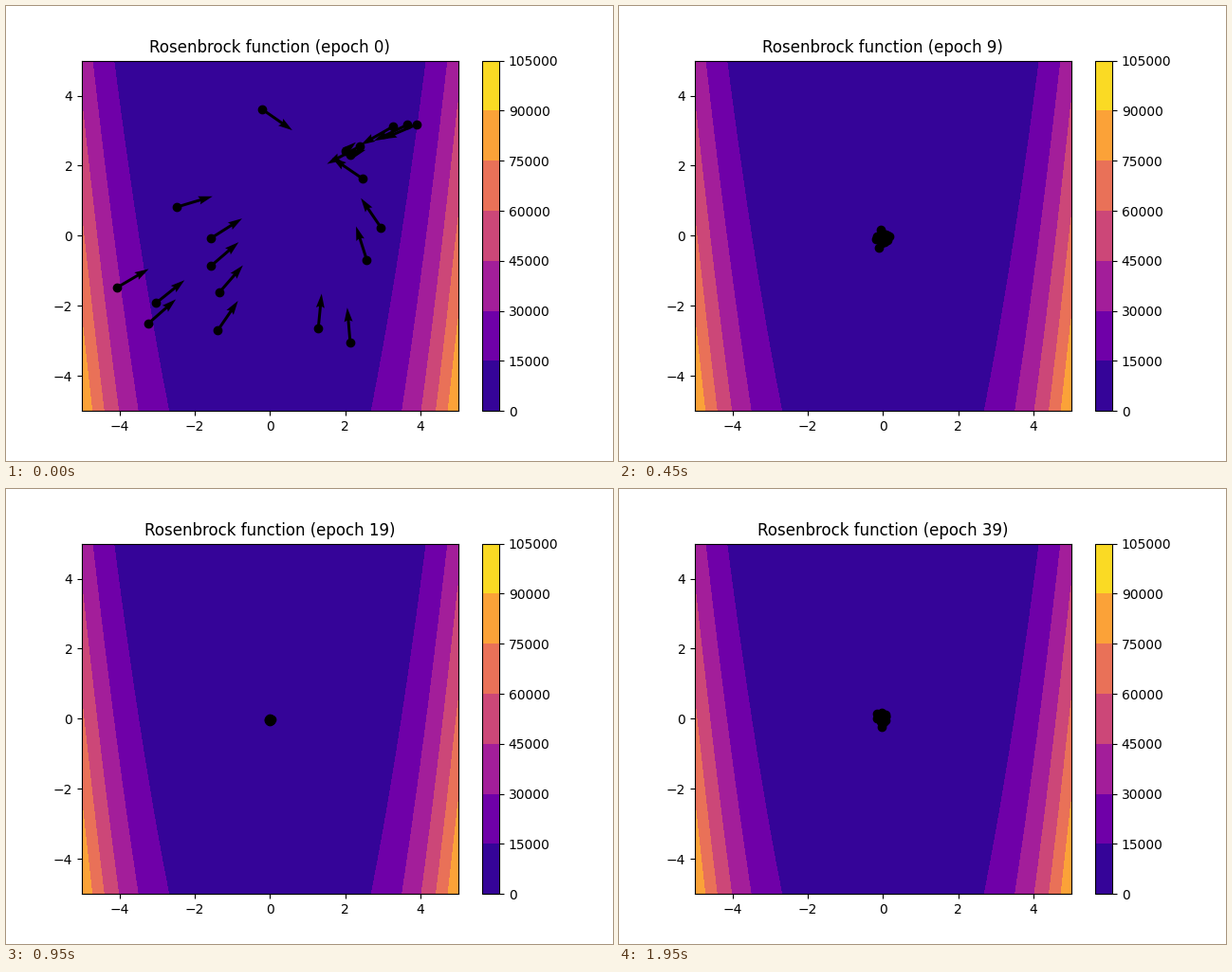
Animation of 640x480 px, one loop 2000 ms. Source, as a matplotlib script:

```python
import numpy as np
import matplotlib.pyplot as plt
from matplotlib.animation import FuncAnimation

EPOCHS = 40
INERTIA = 0.2
FIRST_BEST = np.array([1.72, 2.17])
NEXT_BEST = np.array([-0.5, 0.35])
HOME = np.array([0, -0.02])

START = np.array([
    (-.21, 3.61), (3.27, 3.12), (3.65, 3.17), (3.90, 3.18), (2.38, 2.55),
    (2.00, 2.42), (2.13, 2.31), (2.46, 1.63), (-2.48, .82), (-1.57, -.07),
    (-1.57, -.86), (-1.35, -1.62), (-1.39, -2.70), (-3.03, -1.92),
    (-3.23, -2.50), (-4.07, -1.48), (2.95, .23), (2.57, -.69),
    (1.28, -2.65), (2.13, -3.05)])


def rosenbrock(x, y):
    return (1 - x) ** 2 + 100 * (y - x ** 2) ** 2


def length(v):
    return np.hypot(v[:, :1], v[:, 1:])


def cap(v):
    """Limit every speed to 1."""
    return v / np.maximum(length(v), 1)


def first_step(x):
    """Full speed to the best point; those already there fly on past it."""
    d = FIRST_BEST - x
    r = length(d)
    return np.where(r < 0.5, -d, d / r)


def fly(seed=4):
    """Positions and velocities of the swarm for every epoch."""
    rng = np.random.default_rng(seed)
    x, v = START, first_step(START)
    path = [(x, v)]
    for t in range(1, EPOCHS):
        x = x + v
        goal = NEXT_BEST if t <= 3 else HOME
        # Eager overshooting at first, then a calm approach.
        gain = rng.uniform(1, 2.5, (len(x), 1)) if t < 6 else 0.12
        v = INERTIA * v + gain * (goal - x)
        if t >= 27:
            v = v + rng.normal(0, 0.035, x.shape)
        v = cap(v)
        path.append((x, v))
    return path


path = fly()

fig, ax = plt.subplots(figsize=(6.4, 4.8), dpi=100)
grid = np.linspace(-5, 5, 100)
X, Y = np.meshgrid(grid, grid)
fill = ax.contourf(X, Y, rosenbrock(X, Y), levels=np.arange(0, 105001, 15000),
                   cmap="plasma")
fig.colorbar(fill, ax=ax)

pos, vel = path[0]
dots = ax.scatter(*pos.T, color="black")
arrows = ax.quiver(*pos.T, *vel.T, color="black", angles="xy",
                   scale_units="xy", scale=1)
title = ax.set_title("")
ax.set(xlim=(-5, 5), ylim=(-5, 5))


def update(epoch):
    pos, vel = path[epoch]
    dots.set_offsets(pos)
    arrows.set_offsets(pos)
    arrows.set_UVC(*vel.T)
    title.set_text(f"Rosenbrock function (epoch {epoch})")
    return dots, arrows, title


anim = FuncAnimation(fig, update, frames=EPOCHS, interval=50, repeat=True)
plt.show()
```
